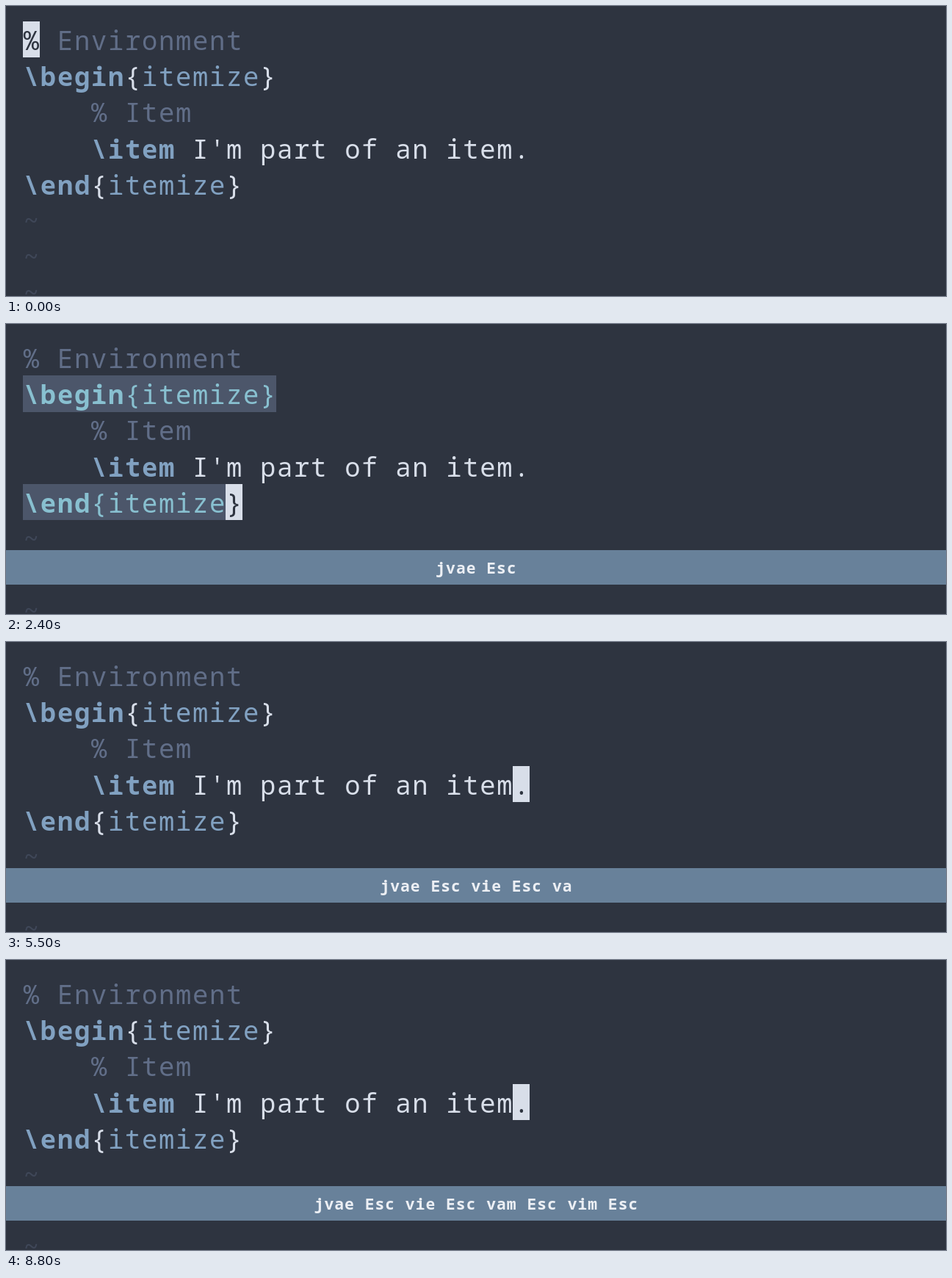
An HTML page for the animation above (9900 ms loop, 1280 by 395 pixels).

```html
<!DOCTYPE html>
<html lang="en">
<head>
<meta charset="utf-8">
<title>LaTeX text objects</title>
<style>
  html, body { margin: 0; width: 100%; height: 100%; overflow: hidden; background: #2e3440; }
  svg { display: block; }
  text { font-family: "Noto Sans Mono", "DejaVu Sans Mono", monospace; white-space: pre; }
  .code { font-size: 35.5px; letter-spacing: 1.7px; }
  .keys { font-size: 21.3px; letter-spacing: 1.02px; font-weight: 700; }
  .bold { font-weight: 700; }
</style>
</head>
<body>
<svg id="stage" width="1280" height="395" viewBox="0 0 1280 395"></svg>
<script>
const LOOP = 9900, CELL = 23, LEFT = 23, KEY_CELL = 13.8, HOLD = 200;
const FG = '#d8dee9', BG = '#2e3440', BLUE = '#81a1c1', GREY = '#616e88', DIM = '#3f4758';

// Each token: text, colour, bold
const env = name => [[name, BLUE, true], ['{', FG], ['itemize', BLUE], ['}', FG]];
const rows = [
  [['% Environment', GREY]],
  env('\\begin'),
  [['    ', FG], ['% Item', GREY]],
  [['    ', FG], ['\\item', BLUE, true], [" I'm part of an item.", FG]],
  env('\\end'),
  [['~', DIM]], [['~', DIM]], [['~', DIM]]
].map(tokens => tokens.flatMap(([text, color, bold]) =>
  [...text].map(ch => ({ ch, color, bold }))));

const keys = [
  [600, 'j'], [900, 'v'], [1100, 'a'], [1400, 'e'], [2200, 'Esc'],
  [2600, 'v'], [2800, 'i'], [3100, 'e'], [3900, 'Esc'],
  [5000, 'v'], [5300, 'a'], [5700, 'm'], [6600, 'Esc'],
  [7200, 'v'], [7500, 'i'], [7800, 'm'], [8600, 'Esc']
];

// Editor states: cursor [row, col], selected ranges [row, from, to], matched delimiters
const environment = [[1, 0, 15], [4, 0, 13]];
const end = [3, 29];
const states = [
  { at: 0, cursor: [0, 0] },
  { at: 600, cursor: [1, 0], match: environment },
  { at: 1500, cursor: [4, 12], select: [[1, 0, 15], [2, 0, 10], [3, 0, 30], [4, 0, 13]] },
  { at: 2300, cursor: [4, 12], match: environment },
  { at: 3100, cursor: end, select: [[2, 4, 10], [3, 0, 30]] },
  { at: 4000, cursor: end },
  { at: 5700, cursor: end, select: [[3, 0, 30]] },
  { at: 6700, cursor: end },
  { at: 7800, cursor: end, select: [[3, 10, 30]] },
  { at: 8700, cursor: end }
];

const rowTop = r => Math.round(21.2 + 49.2 * r);
const rect = (x, y, w, h, fill) =>
  `<rect x="${x}" y="${y}" width="${w}" height="${h}" fill="${fill}"/>`;
const cells = ([r, from, to], fill) =>
  rect(LEFT + CELL * from, rowTop(r), CELL * (to - from), rowTop(r + 1) - rowTop(r), fill);

function drawEditor({ cursor: [cr, cc], select = [], match = [] }) {
  const matched = (r, c) => match.some(([mr, from, to]) => r === mr && c >= from && c < to);
  const color = (r, c, base) =>
    r === cr && c === cc ? BG : matched(r, c) ? '#88c0d0' : base;
  const text = rows.map((row, r) =>
    `<text class="code" x="${LEFT + 0.85}" y="${60 + 49.2 * r}">` +
    row.map(({ ch, color: base, bold }, c) =>
      `<tspan fill="${color(r, c, base)}"${bold ? ' class="bold"' : ''}>${ch}</tspan>`).join('') +
    '</text>');
  return match.map(m => cells(m, '#4c566a')).join('') +
    select.map(s => cells(s, '#434c5e')).join('') +
    cells([cr, cc, cc + 1], FG) + text.join('');
}

function drawKeys(t) {
  const pressed = keys.filter(([at]) => at <= t);
  if (!pressed.length) return '';
  const [at, last] = pressed[pressed.length - 1];
  const label = pressed.map(([, k]) => k === 'Esc' ? ' Esc ' : k).join('').trimEnd();
  const width = KEY_CELL * label.length, x = 640 - width / 2, lastWidth = KEY_CELL * last.length;
  return rect(0, 308, 1280, 47, '#68819a') +
    `<text class="keys" x="${x + 0.5}" y="340" fill="#eceff4">${label}</text>` +
    (t < at + HOLD ? rect(x + width - lastWidth, 341, lastWidth, 1.6, '#eceff4') : '');
}

const stage = document.getElementById('stage');
let shown = '';
function frame() {
  const t = performance.now() % LOOP;
  const state = states.filter(s => s.at <= t).pop();
  const picture = rect(0, 0, 1280, 395, BG) + drawEditor(state) + drawKeys(t);
  if (picture !== shown) stage.innerHTML = shown = picture;
  requestAnimationFrame(frame);
}
frame();
</script>
</body>
</html>
```
